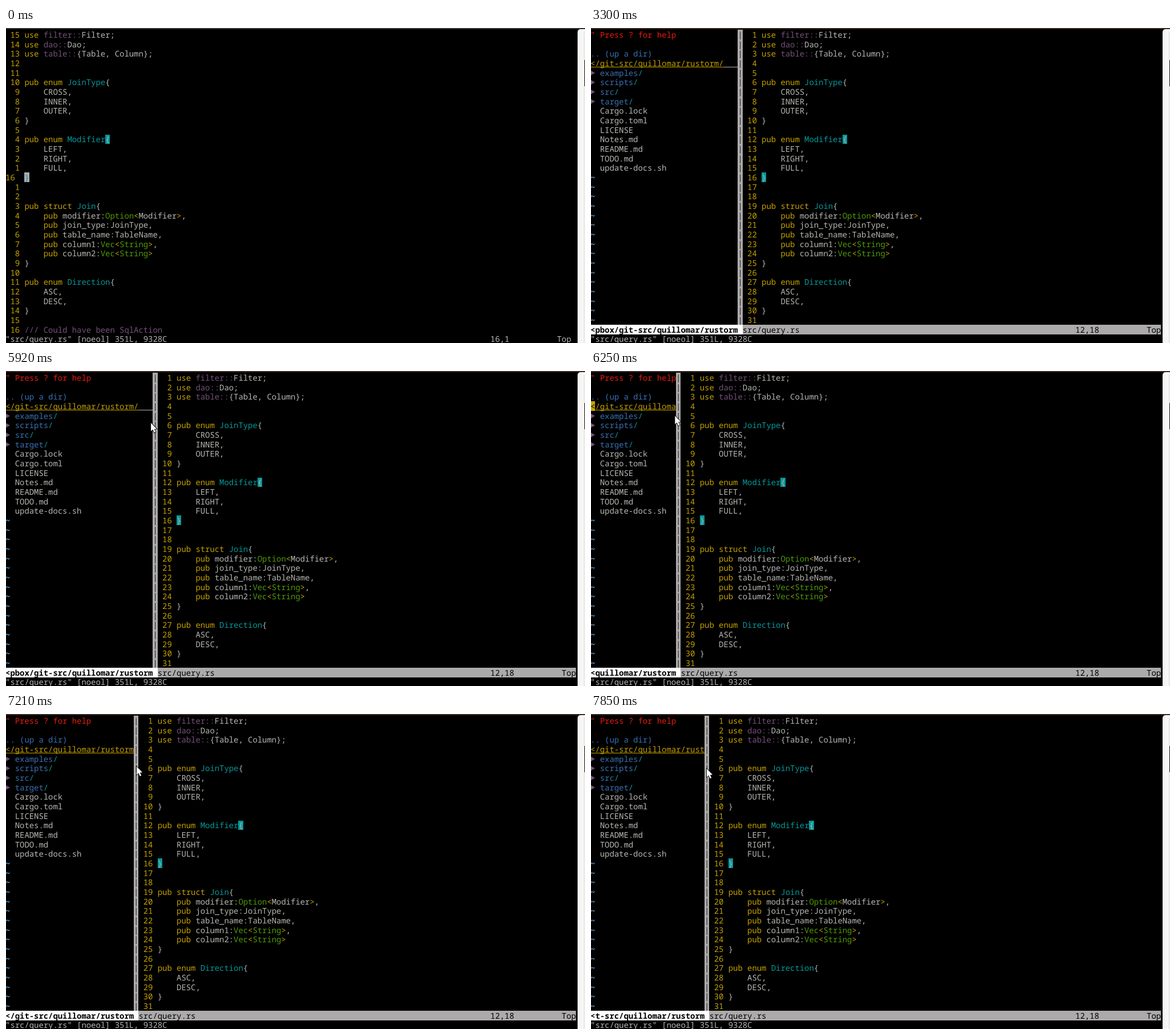
An HTML page with a canvas for the animation above (8000 ms loop, 1015 px wide and 552 px high).

```html
<!DOCTYPE html>
<html lang="en">
<head>
<meta charset="utf-8">
<title>Terminal editor</title>
<style>
html, body { margin: 0; width: 100%; height: 100%; overflow: hidden; background: #000; }
canvas { display: block; }
</style>
</head>
<body>
<canvas width="1015" height="552"></canvas>
<script>
const W = 1015, H = 552, LOOP = 8000;
const ctx = document.querySelector('canvas').getContext('2d');
const CW = 25 / 3, RH = 50 / 3;
const colX = col => col * CW - 0.9;
const rowY = row => row * RH + 3.2;

const INK = '#b6b6b2', GREY = '#acaaab', YELLOW = '#c4a000', PURPLE = '#75507b',
  TEAL = '#06989a', GREEN = '#4e9a06', BLUE = '#3870b2', RED = '#e81c0c', SKY = '#68b0ee';
const FONT = '14px "Noto Sans Mono", "DejaVu Sans Mono", monospace';

const code = `use filter::Filter;
use dao::Dao;
use table::{Table, Column};


pub enum JoinType{
    CROSS,
    INNER,
    OUTER,
}

pub enum Modifier{
    LEFT,
    RIGHT,
    FULL,
}


pub struct Join{
    pub modifier:Option<Modifier>,
    pub join_type:JoinType,
    pub table_name:TableName,
    pub column1:Vec<String>,
    pub column2:Vec<String>
}

pub enum Direction{
    ASC,
    DESC,
}

/// Could have been SqlAction`.split('\n');
const syntax = /(\/\/\/.*|\w+::)|(\b(?:use|pub|enum|struct)\b|[<>])|((?<=(?:enum|struct) )\w+)|(Option|Vec|String)/g;
const syntaxColors = [PURPLE, YELLOW, TEAL, GREEN];

const dirs = ['examples', 'scripts', 'src', 'target'];
const files = ['Cargo.lock', 'Cargo.toml', 'LICENSE', 'Notes.md', 'README.md', 'TODO.md', 'update-docs.sh'];
const root = '</git-src/quillomar/rustorm/';
const path = 'Dropbox/git-src/quillomar/rustorm';
const message = '"src/query.rs" [noeol] 351L, 9328C';

const POINT = 1060, JUMP = 1720, SPLIT = 2710, POINT_AGAIN = 3760, DRAG = 5840;
const BLINK = 568, LAG = 35;

// Places where the pointer rests or turns: time, x, y
const stops = [
  [POINT, 913, 405], [1550, 336, 191], [POINT_AGAIN, 335, 182], [4550, 44, 74],
  [5020, 48, 79], [5460, 262, 92], [DRAG, 262, 92], [6400, 123, 76],
  [6550, 123, 76], [6760, 208, 91], [6870, 221, 91], [7130, 221, 91],
  [7210, 229, 92], [7510, 135, 94], [7850, 203, 96]
];

function pointerAt(t) {
  const next = stops.findIndex(s => s[0] > t);
  if (next < 0) return stops.at(-1).slice(1);
  const [t0, x0, y0] = stops[next - 1], [t1, x1, y1] = stops[next];
  const u = (t - t0) / (t1 - t0), e = u * u * (3 - 2 * u);
  return [x0 + (x1 - x0) * e, y0 + (y1 - y0) * e];
}

// The cursor lights up again after each jump, then blinks evenly.
function cursorLit(t) {
  const since = t < JUMP ? 0 : t < SPLIT ? JUMP : SPLIT + 20;
  return Math.floor(Math.max(0, t - since) / BLINK) % 2 === 0;
}

function fill(col, row, cols, color) {
  const x = Math.round(colX(col)), y = Math.round(rowY(row));
  ctx.fillStyle = color;
  ctx.fillRect(x, y, Math.round(colX(col + cols)) - x, Math.round(rowY(row + 1)) - y);
}

// Each character sits in its own terminal cell.
function put(col, row, text, color = INK, bg) {
  if (bg) fill(col, row, text.length, bg);
  ctx.fillStyle = color;
  [...text].forEach((ch, i) => {
    if (ch !== ' ') ctx.fillText(ch, colX(col + i), rowY(row) + 13.7);
  });
}

function putBold(...args) {
  ctx.font = 'bold ' + FONT;
  put(...args);
  ctx.font = FONT;
}

function drawCodeLine(col, row) {
  const line = code[row];
  put(col, row, line.replace(syntax, m => ' '.repeat(m.length)));
  for (const m of line.matchAll(syntax)) {
    put(col + m.index, row, m[0], syntaxColors[m.slice(1).findIndex(Boolean)]);
  }
}

// Numbers are relative to the current row, or absolute when there is none.
function drawCode(left, rows, current, lit) {
  for (let row = 0; row < rows; row++) {
    const here = row === current;
    const n = here || current === undefined ? row + 1 : Math.abs(row - current);
    put(left, row, here ? String(n) : String(n).padStart(3), YELLOW);
    drawCodeLine(left + 4, row);
  }
  for (const [row, col] of [[11, 17], [15, 0]]) {
    const colors = lit && row === current ? [TEAL, GREY] : [INK, TEAL];
    put(left + 4 + col, row, code[row][col], ...colors);
  }
}

function drawDir(name, row) {
  const y = rowY(row) + 8.8;
  ctx.fillStyle = PURPLE;
  ctx.beginPath();
  ctx.moveTo(0, y - 4);
  ctx.lineTo(7, y);
  ctx.lineTo(0, y + 4);
  ctx.fill();
  put(2, row, name, BLUE);
  put(2 + name.length, row, '/', TEAL);
}

function drawTree(width, lit) {
  ctx.save();
  ctx.beginPath();
  ctx.rect(0, 0, colX(width), H);
  ctx.clip();
  put(0, 0, '" Press ? for help', RED);
  put(0, 2, '.. (up a dir)', BLUE);
  put(0, 3, root, YELLOW);
  const rootEnd = colX(root.length);
  ctx.fillRect(0, 68, rootEnd, 1);
  ctx.fillStyle = INK;
  ctx.fillRect(rootEnd, 68, W, 1);
  if (lit) put(0, 3, '<', '#000', YELLOW);
  dirs.forEach((name, i) => drawDir(name, 4 + i));
  files.forEach((name, i) => put(2, 8 + i, name));
  for (let row = 15; row < 31; row++) putBold(0, row, '~', SKY);
  ctx.restore();
}

function drawSplit(sep, lit) {
  drawTree(sep, lit);
  drawCode(sep + 1, 31);
  for (let row = 0; row < 31; row++) put(sep, row, '|', '#2a1c12', GREY);
  fill(0, 31, 120, GREY);
  fill(0, 31, sep + 1, '#fff');
  putBold(0, 31, '<' + path.slice(1 - sep), '#000');
  put(sep + 1, 31, 'src/query.rs', '#000');
  put(102, 31, '12,18', '#000');
  put(117, 31, 'Top', '#000');
}

function drawFrame(t) {
  ctx.fillStyle = t < JUMP ? '#393836' : '#402e2b';
  ctx.fillRect(0, 0, W, 2);
  ctx.fillStyle = '#f6f6f5';
  ctx.beginPath();
  ctx.roundRect(1002, 2, 20, H + 10, 5);
  ctx.fill();
  ctx.fillStyle = '#dcdad8';
  ctx.fillRect(1013, 6, 1, H);
  ctx.fillStyle = '#222';
  ctx.fillRect(1014, 56, 1, 46);
}

function drawPointer([x, y]) {
  const arrow = new Path2D('M0 0V14.5L3.3 11.5 5.8 17 8.2 16 5.8 10.7 10 10.3Z');
  ctx.save();
  ctx.translate(x, y);
  ctx.lineWidth = 1.6;
  ctx.strokeStyle = '#000';
  ctx.stroke(arrow);
  ctx.fillStyle = '#fff';
  ctx.fill(arrow);
  ctx.restore();
}

function draw(t) {
  ctx.fillStyle = '#000';
  ctx.fillRect(0, 0, W, H);
  ctx.font = FONT;
  ctx.textRendering = 'geometricPrecision';
  const lit = cursorLit(t);

  if (t < SPLIT) {
    drawCode(0, 32, t < JUMP ? 15 : 11, lit);
    put(102, 32, t < JUMP ? '16,1' : '12,18');
    put(116, 32, 'Top');
  } else {
    drawSplit(t < DRAG + LAG ? 31 : Math.floor(pointerAt(t - LAG)[0] / CW), lit);
  }
  put(0, 32, message);
  drawFrame(t);
  if (t >= POINT && t < JUMP || t >= POINT_AGAIN) drawPointer(pointerAt(t));
}

const start = performance.now();
function tick() {
  draw((performance.now() - start) % LOOP);
  requestAnimationFrame(tick);
}
tick();
</script>
</body>
</html>
```
